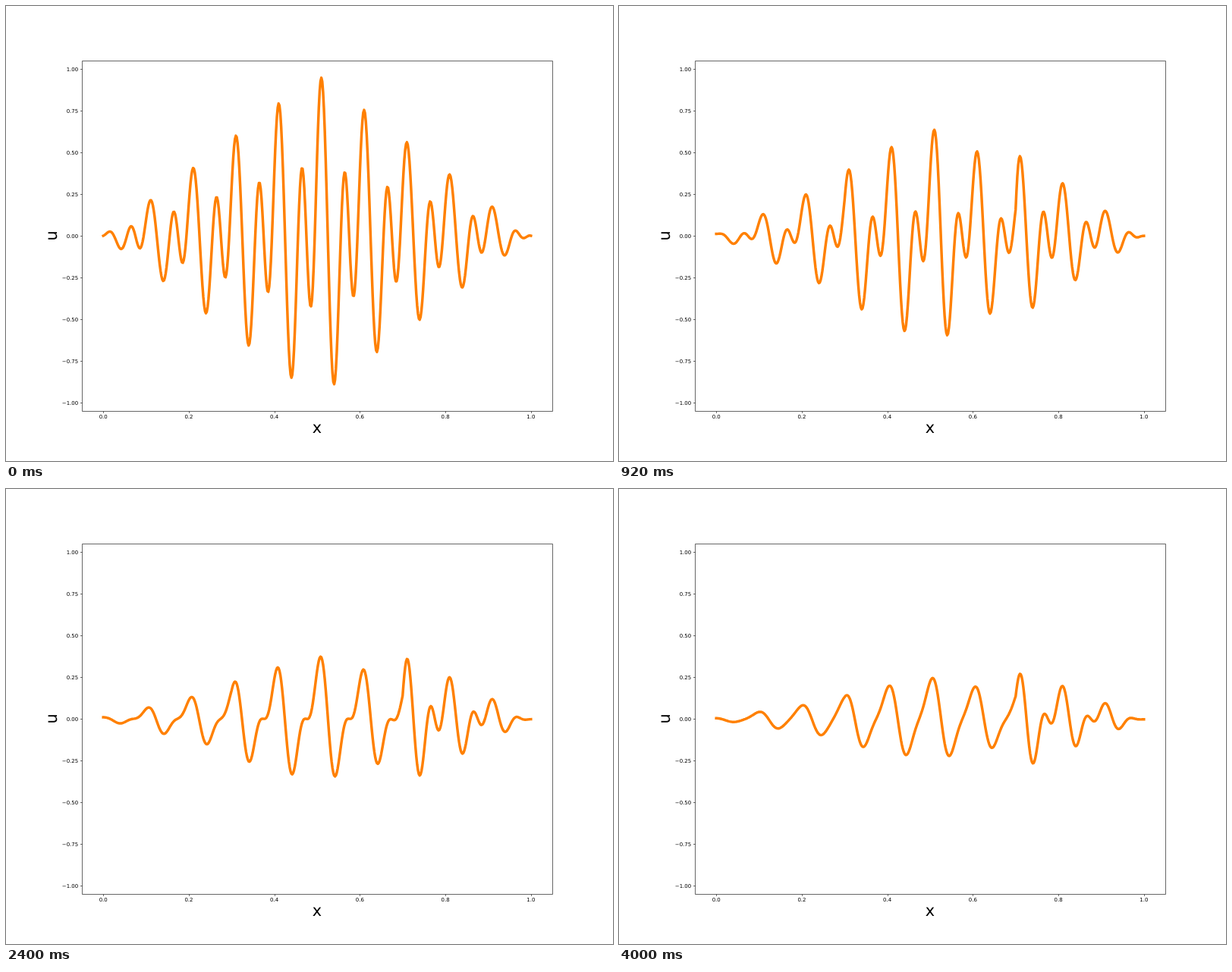
Animation, 800 px wide and 600 px high, one loop 4.04 s. Source, as an HTML page:

```html
<!DOCTYPE html>
<html lang="en">
<head>
<meta charset="utf-8">
<title>Diffusion in a layered rod</title>
<style>
  html, body { margin: 0; width: 100%; height: 100%; overflow: hidden; background: #fff; }
  svg { display: block; width: 800px; height: 600px; }
  text { font: 6.94px "DejaVu Sans", sans-serif; text-rendering: geometricPrecision; }
  .label { font-size: 20.83px; text-anchor: middle; }
  #axes { fill: none; stroke: #000; stroke-width: .6; }
  #curve { fill: none; stroke: #ff8000; stroke-width: 3.47; stroke-linecap: square; stroke-linejoin: round; }
</style>
</head>
<body>
<svg viewBox="0 0 800 600">
  <path id="curve"/>
  <path id="axes"/>
  <g id="ticks"></g>
  <text class="label" x="410" y="562.8">x</text>
  <text class="label" transform="translate(66.8 303) rotate(-90)">u</text>
</svg>
<script>
const STEP = 40, FRAMES = 101, CELLS = 500, SUBSTEPS = 5;
const byId = id => document.getElementById(id);
const px = x => 128.18 + 563.64 * x;
const py = u => 303 - 220 * u;
const snap = v => Math.round(v) + .5;

function drawAxes() {
  let path = 'M100.5 72.5H720.5V534.5H100.5Z', labels = '';
  const label = (x, y, anchor, text) =>
    labels += `<text x="${x}" y="${y}" text-anchor="${anchor}">${text}</text>`;
  for (let i = 0; i <= 5; i++) {
    const x = px(i / 5);
    path += `M${snap(x)} 534.5v2.43`;
    label(x, 544.1, 'middle', (i / 5).toFixed(1));
  }
  for (let i = -4; i <= 4; i++) {
    const y = py(i / 4);
    path += `M100.5 ${snap(y)}h-2.43`;
    label(95.1, y + 2.9, 'end', (i / 4).toFixed(2).replace('-', '\u2212'));
  }
  byId('axes').setAttribute('d', path);
  byId('ticks').innerHTML = labels;
}

// Three harmonics under a triangular envelope
function initial(x) {
  const a = 20 * Math.PI * x;
  return Math.min(x, 1 - x) *
    (.847 * Math.cos(a) + 1.345 * Math.sin(2 * a) + .1 * Math.cos(3 * a));
}

// Diffusivity per frame in the three layers
const diffusivity = x => 2.02e-6 * (x < .3 ? 1 : x < .7 ? .8 : .3);

// Explicit heat equation with insulated ends
function simulate() {
  const u = Float64Array.from({ length: CELLS + 1 }, (_, i) => initial(i / CELLS));
  const rate = Float64Array.from({ length: CELLS },
    (_, i) => diffusivity((i + .5) / CELLS) * CELLS ** 2 / SUBSTEPS);
  const flux = new Float64Array(CELLS);
  const states = [u.slice()];
  while (states.length < FRAMES) {
    for (let s = 0; s < SUBSTEPS; s++) {
      for (let i = 0; i < CELLS; i++) flux[i] = rate[i] * (u[i + 1] - u[i]);
      for (let i = 1; i < CELLS; i++) u[i] += flux[i] - flux[i - 1];
      u[0] += 2 * flux[0];
      u[CELLS] -= 2 * flux[CELLS - 1];
    }
    states.push(u.slice());
  }
  return states;
}

const toPath = u => 'M' + Array.from(u, (v, i) =>
  px(i / CELLS).toFixed(2) + ' ' + py(v).toFixed(2)).join('L');

drawAxes();
const paths = simulate().map(toPath);
const start = performance.now();

function draw() {
  const frame = Math.floor((performance.now() - start) / STEP) % FRAMES;
  byId('curve').setAttribute('d', paths[frame]);
  requestAnimationFrame(draw);
}
draw();
</script>
</body>
</html>
```
